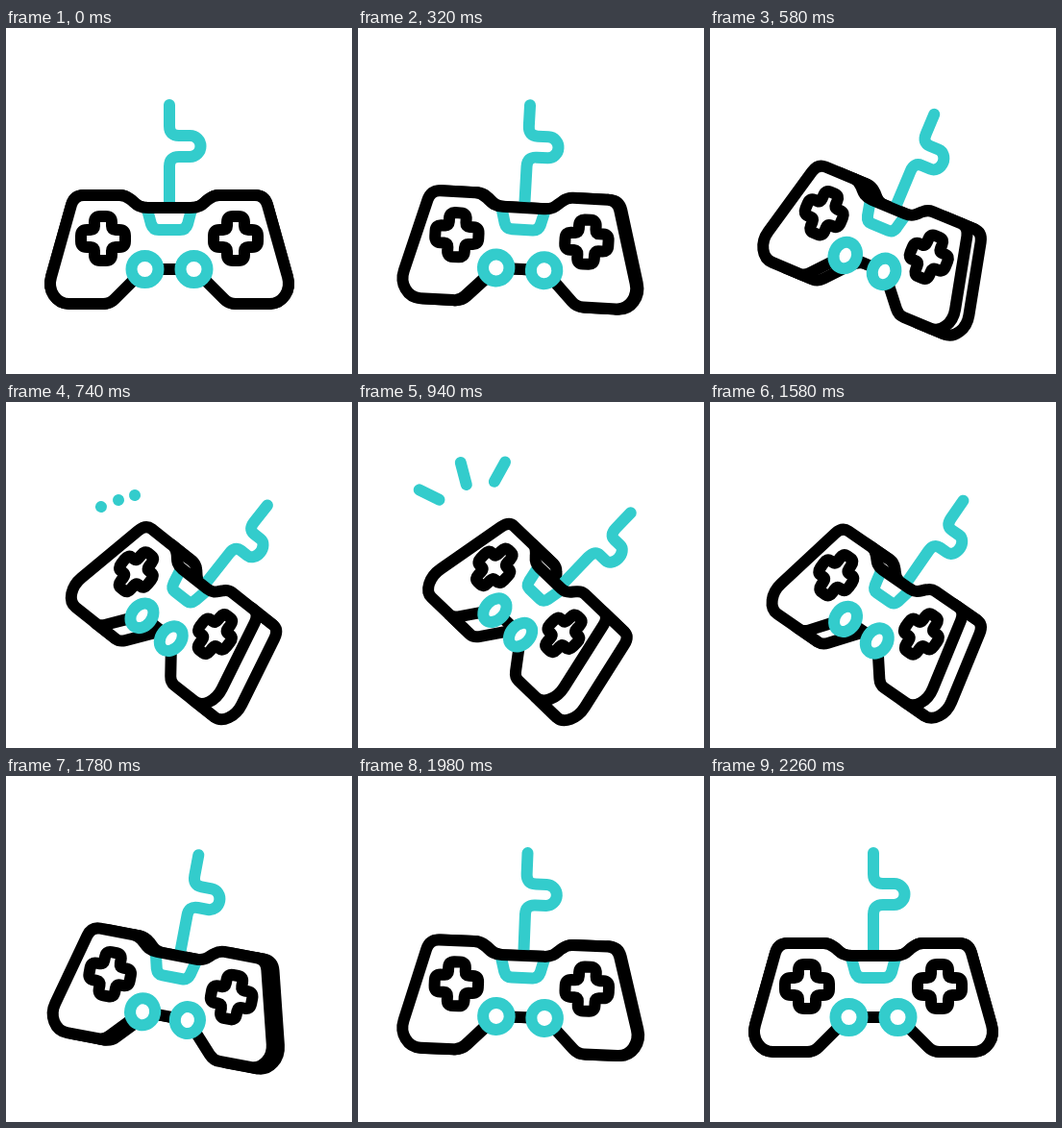
Animation, 360 px wide and 360 px high, one loop 2.4 s. Source, as an HTML page with a canvas:

```html
<!DOCTYPE html>
<html>
<head>
<meta charset="utf-8">
<title>Game controller</title>
<style>
  html, body { margin: 0; width: 100%; height: 100%; overflow: hidden; background: #fff; }
  canvas { display: block; }
</style>
</head>
<body>
<canvas id="stage" width="360" height="360"></canvas>
<script>
const LOOP = 2400, BLACK = '#000', TEAL = '#33cccc', WHITE = '#fff';
const ctx = document.getElementById('stage').getContext('2d');
ctx.lineWidth = 12;
ctx.lineCap = ctx.lineJoin = 'round';

// Face coordinates: x is measured from the axis of symmetry.
const body = new Path2D(`M-22,187 H22 C34,187 36,181 41,178 Q46,174 52,174 H89
  Q99,174 102,184 L123,259 C127,273 118,287 104,287 H69 Q62,287 57,282 L35,260
  Q26,251 18,251 H-18 Q-26,251 -35,260 L-57,282 Q-62,287 -69,287 H-104
  C-118,287 -127,273 -123,259 L-102,184 Q-99,174 -89,174 H-52
  Q-46,174 -41,178 C-36,181 -34,187 -22,187 Z`);
const cable = new Path2D(`M0,187 V144 Q0,134 10,134 H21.5 A11,11 0 0 0 21.5,112
  H10 Q0,112 0,102 V80`);
const plug = new Path2D('M-23,189 L-19,204 Q-17,210 -11,210 H11 Q17,210 19,204 L23,189');
const cross = `m-9,-17 q0,-6 6,-6 h6 q6,0 6,6 v4 q0,4 4,4 h4 q6,0 6,6 v6 q0,6 -6,6
  h-4 q-4,0 -4,4 v4 q0,6 -6,6 h-6 q-6,0 -6,-6 v-4 q0,-4 -4,-4 h-4 q-6,0 -6,-6
  v-6 q0,-6 6,-6 h4 q4,0 4,-4 z`;
const pads = new Path2D(`M-69,219 ${cross} M69,219 ${cross}`);
const sticks = new Path2D();
for (const x of [-25.5, 25.5]) {
  sticks.moveTo(x + 14, 251);
  sticks.arc(x, 251, 14, 0, 7);
}
const sparks = [[99, 109, 61, 90], [117, 102, 106, 60], [134, 97, 154.5, 60]];

const clamp = v => Math.min(1, Math.max(0, v));
const smooth = v => v * v * (3 - 2 * v);
const mix = (a, b, k) => a + (b - a) * k;

// Cubic bezier (.75, 0, .25, 1), solved by bisection.
function ease(x) {
  let lo = 0, hi = 1;
  x = clamp(x);
  for (let i = 0; i < 24; i++) {
    const s = (lo + hi) / 2, r = 1 - s;
    if (2.25 * r * r * s + 0.75 * r * s * s + s * s * s < x) lo = s; else hi = s;
  }
  return smooth(lo);
}

function paint(path, stroke, fill) {
  if (fill) { ctx.fillStyle = fill; ctx.fill(path); }
  if (stroke) { ctx.strokeStyle = stroke; ctx.stroke(path); }
}

function drawSparks(t) {
  const end = smooth(clamp((t - 740) / 240)), start = smooth(clamp((t - 840) / 240));
  if (end <= start) return;
  const p = new Path2D();
  for (const [x0, y0, x1, y1] of sparks) {
    p.moveTo(mix(x0, x1, start), mix(y0, y1, start));
    p.lineTo(mix(x0, x1, end), mix(y0, y1, end));
  }
  paint(p, TEAL);
}

function draw(t) {
  const turn = Math.min(ease(t / 1160), ease((2263 - t) / 1160));
  const squeeze = 1 - 0.285 * turn;

  // Places a path on a plane shifted sideways; outlines keep their weight.
  const place = (path, shift) => {
    const m = new DOMMatrix()
      .translate(170, 246 - 10.4 * turn * turn)
      .rotate(45 * turn)
      .translate(shift * turn, -246)
      .scale(squeeze, 1);
    const placed = new Path2D();
    placed.addPath(path, m);
    return placed;
  };

  ctx.fillStyle = WHITE;
  ctx.fillRect(0, 0, 360, 360);
  drawSparks(t);

  paint(place(body, 15.4), BLACK, WHITE);
  const depth = 30.8 * turn / squeeze;
  const edges = new Path2D();
  for (const [x, y] of [[-52, 174], [89, 174], [104, 287], [-69, 287]]) {
    edges.moveTo(x, y);
    edges.lineTo(x + depth, y);
  }
  paint(place(edges, -15.4), BLACK);
  paint(place(cable, -1.5), TEAL);

  const front = place(body, -15.4);
  paint(front, null, WHITE);
  paint(place(plug, -15.4), TEAL);
  paint(front, BLACK);
  paint(place(pads, -15.4), BLACK);
  paint(place(sticks, -15.4), TEAL, WHITE);
}

const begin = performance.now();
function tick() {
  draw((performance.now() - begin) % LOOP);
  requestAnimationFrame(tick);
}
tick();
</script>
</body>
</html>
```
